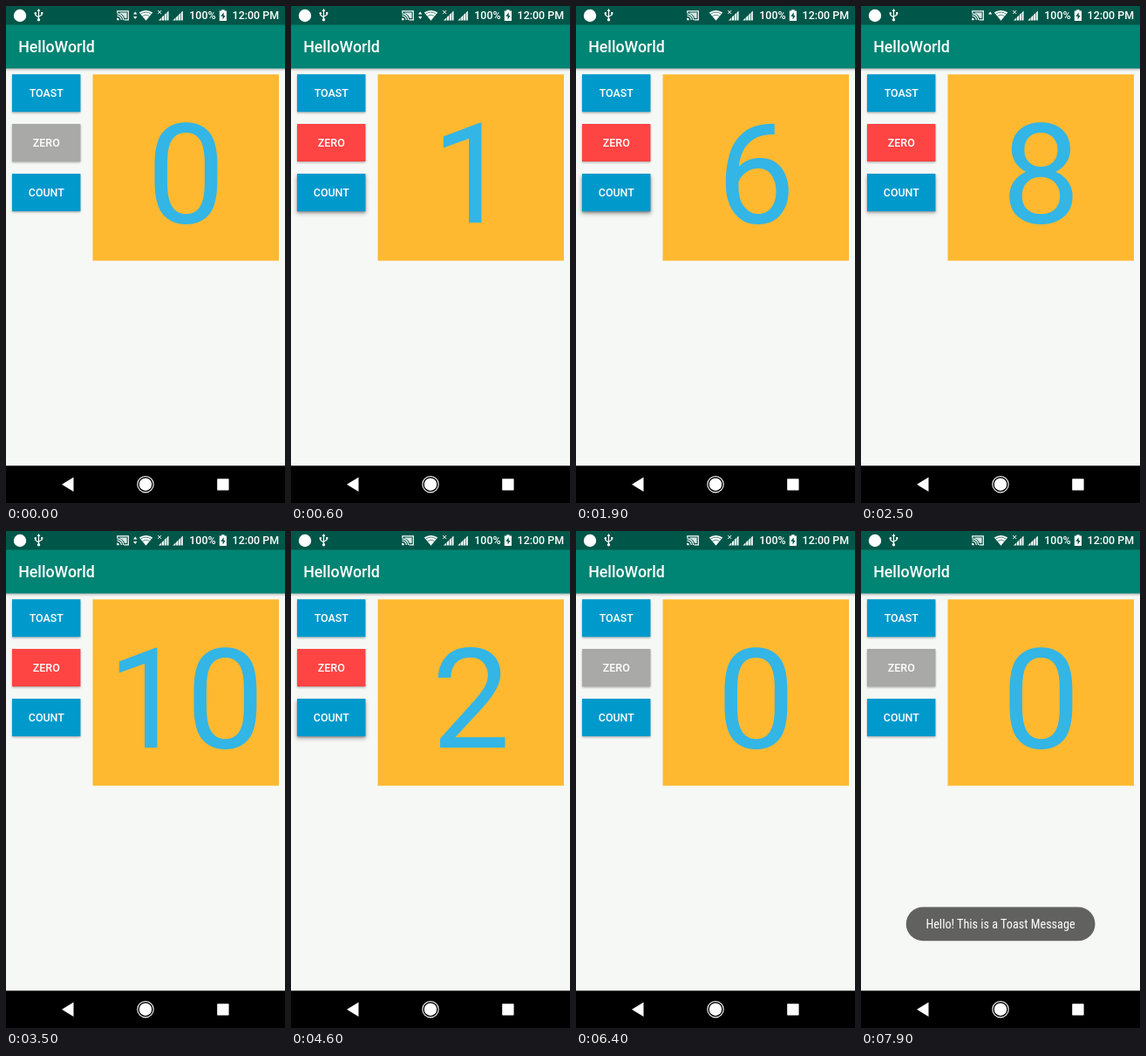
These frames come from a looping animation (320 px wide and 569 px high, 8000 ms). An HTML page:

```html
<!DOCTYPE html>
<html lang="en">
<head>
<meta charset="utf-8">
<title>HelloWorld</title>
<style>
  html, body { margin: 0; width: 100%; height: 100%; overflow: hidden; background: #f6f8f6; }
  svg { display: block; width: 100%; height: 100%; }
  text { font-family: Roboto, sans-serif; fill: #fff; }
  .medium { font-weight: 500; font-size: 12.44px; }
  .title { font-weight: 500; font-size: 17.78px; }
  .mid { text-anchor: middle; }
  #count { font-size: 160px; fill: #33b5e5; }
  #toastText { font-family: "Roboto Condensed", Roboto, sans-serif; font-size: 14.22px; }
  .line { fill: none; stroke: #fff; }
</style>
</head>
<body>
<svg viewBox="0 0 320 569">
  <defs>
    <linearGradient id="barShade" x2="0" y2="1">
      <stop stop-color="#000" stop-opacity=".26"/>
      <stop offset="1" stop-color="#000" stop-opacity="0"/>
    </linearGradient>
    <filter id="soft" x="-20%" y="-30%" width="140%" height="160%"><feGaussianBlur stdDeviation="1.2"/></filter>
    <filter id="softer" x="-20%" y="-40%" width="140%" height="180%"><feGaussianBlur stdDeviation="2.4"/></filter>
    <path id="signal" d="M0 11L11.5 0V11Z"/>
  </defs>

  <rect width="320" height="569" fill="#f6f8f6"/>
  <rect y="71" width="320" height="4" fill="url(#barShade)"/>
  <rect width="320" height="71.5" fill="#008473"/>
  <rect width="320" height="21.5" fill="#005648"/>
  <text class="title" x="14.2" y="53.3">HelloWorld</text>

  <g id="status" fill="#fff">
    <circle cx="16" cy="11" r="7.2"/>
    <!-- USB -->
    <path class="line" d="M37.5 5V15M33.8 8.5V10.5L37.5 13M41.2 8V10L37.5 12.3" stroke-width="1.2"/>
    <path d="M37.5 3L39.4 6H35.6Z"/>
    <circle cx="37.5" cy="15.8" r="1.7"/>
    <circle cx="33.8" cy="8.3" r="1.2"/>
    <rect x="40.1" y="7" width="2.2" height="2.2"/>
    <!-- Cast -->
    <path class="line" d="M127.8 8V5.8H140.3V15.8H135.5M127.5 11.2A4.8 4.8 0 0 1 132.3 16M127.5 8.9A7.1 7.1 0 0 1 134.6 16" stroke-width="1.2"/>
    <path d="M127.2 13.6A2.6 2.6 0 0 1 129.8 16.2H127.2Z"/>
    <path d="M130.5 7.6H138.6V14H136A8 8 0 0 0 130.5 8.4Z" opacity=".85"/>
    <!-- Data arrows -->
    <path id="up" d="M148.2 6.5L150.4 9.6H146Z"/>
    <path id="down" d="M148.2 15L150.4 11.9H146Z"/>
    <!-- Wi-Fi -->
    <path d="M160.5 16.8L152.8 7.6A12.4 12.4 0 0 1 168.2 7.6Z"/>
    <path class="line" d="M154.4 9.2A10 10 0 0 1 166.6 9.2M156.5 11.8A6.5 6.5 0 0 1 164.5 11.8" style="stroke:#005648" stroke-width=".7"/>
    <use href="#signal" x="175" y="5.5"/>
    <use href="#signal" x="191.3" y="5.5"/>
    <path class="line" d="M178.5 5V17M181.5 5V17M184.3 5V17M194.8 5V17M197.8 5V17M200.6 5V17" style="stroke:#005648" stroke-width=".7"/>
    <path class="line" d="M174.2 5L178.2 9M178.2 5L174.2 9" stroke-width="1"/>
    <text class="medium" x="210.3" y="15.4">100%</text>
    <!-- Battery -->
    <path d="M247.2 4.2H250.6V5.6H253V17H244.8V5.6H247.2Z"/>
    <path d="M249.7 7.2L246.3 11.8H248.6V15.6L251.6 10.9H249.7Z" fill="#005648"/>
    <text class="medium" x="259.6" y="15.4">12:00 PM</text>
  </g>

  <g id="buttons"></g>

  <rect x="99.5" y="78.3" width="213.5" height="213.3" fill="#ffb930"/>
  <text id="count" class="mid" x="206.4" y="248">0</text>

  <g id="toast" opacity="0">
    <rect x="51.7" y="430.5" width="216.8" height="38.8" rx="19.4" fill="#616260"/>
    <text id="toastText" class="mid" x="160" y="455">Hello! This is a Toast Message</text>
  </g>

  <g fill="#fff">
    <rect y="526.3" width="320" height="43" fill="#000"/>
    <path d="M64 547.7L77.5 539.5V556Z"/>
    <circle cx="160" cy="547.7" r="7.2"/>
    <circle class="line" cx="160" cy="547.7" r="9.2" stroke-width="1.1"/>
    <rect x="242.2" y="541.2" width="13.4" height="13.2" rx=".6"/>
  </g>
</svg>
<script>
const LOOP = 8000;
const byId = id => document.getElementById(id);

const buttons = [
  { name: 'TOAST', y: 78.2, color: '#0099cc' },
  { name: 'ZERO', y: 135, color: '#a9a9a8' },
  { name: 'COUNT', y: 192, color: '#0099cc' }
];
byId('buttons').innerHTML = buttons.map(({ name, y, color }) => `
  <rect x="7" y="${y + 1.3}" width="78.4" height="43" opacity=".3" filter="url(#soft)"/>
  <rect id="${name}-lift" x="6.5" y="${y + 3}" width="79.4" height="43" opacity="0" filter="url(#softer)"/>
  <rect id="${name}" x="7" y="${y}" width="78.4" height="43" fill="${color}"/>
  <text class="medium mid" x="46.3" y="${y + 26.2}">${name}</text>`).join('');

// Taps in ms; each takes effect on release.
const taps = {
  COUNT: [500, 800, 1100, 1400, 1600, 1900, 2100, 2300, 2600, 2900,
          4300, 4500, 4800, 5100, 5400, 5700, 5900],
  ZERO: [3700, 6100],
  TOAST: [7000]
};
// Data arrows: [start, up, down]
const traffic = [[0, 1, 1], [900, 0, 0], [1500, 1, 1], [1900, 0, 0],
                 [2400, 1, 0], [2800, 1, 1], [3700, 0, 0], [4300, 1, 0], [4500, 0, 0]];

const clamp = v => Math.max(0, Math.min(1, v));
const lift = (t, tap) => Math.min(clamp((t - tap + 150) / 100), clamp((tap + 200 - t) / 120));

const label = byId('toastText');
if (label.getComputedTextLength() > 180) label.style.fontSize = '12.6px';

function render(t) {
  const reset = Math.max(-1, ...taps.ZERO.filter(z => z <= t));
  const count = taps.COUNT.filter(c => c > reset && c <= t).length;
  byId('count').textContent = count;
  byId('ZERO').setAttribute('fill', count ? '#ff4444' : '#a9a9a8');
  for (const name in taps) {
    const raised = Math.max(...taps[name].map(tap => lift(t, tap)));
    byId(name + '-lift').setAttribute('opacity', 0.3 * raised);
  }
  const [, up, down] = traffic.filter(s => s[0] <= t).pop();
  byId('up').setAttribute('opacity', up);
  byId('down').setAttribute('opacity', down);
  byId('toast').setAttribute('opacity', clamp((t - taps.TOAST[0] - 50) / 350));
}

const start = performance.now();
function frame() {
  render((performance.now() - start) % LOOP);
  requestAnimationFrame(frame);
}
frame();
</script>
</body>
</html>
```
